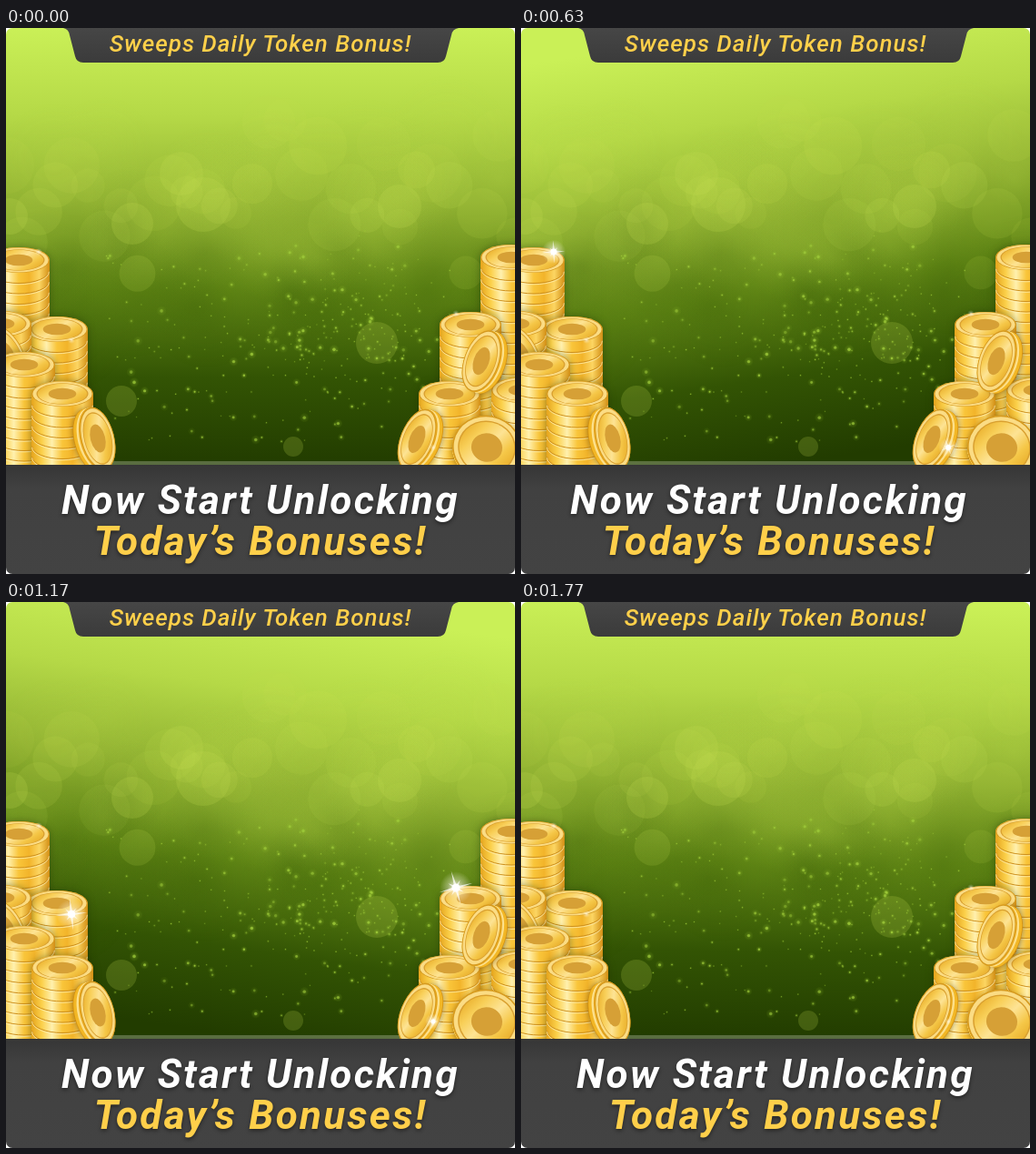
Write an HTML page with a canvas that moves like this. It is 560x600 px and loops after 1.8 s.

```html
<!DOCTYPE html>
<html lang="en">
<head>
<meta charset="utf-8">
<title>Daily bonus</title>
<style>
  html, body { margin: 0; width: 100%; height: 100%; overflow: hidden; background: #fff; }
  #stage { position: relative; width: 560px; height: 600px; overflow: hidden; border-radius: 7px; }
  canvas, svg { position: absolute; left: 0; top: 0; display: block; }
  text { font-family: Roboto, "Liberation Sans", sans-serif; font-style: italic; text-anchor: middle; }
  .small { font-size: 26px; font-weight: 500; letter-spacing: 1px; fill: #ffd04a; }
  .big { font-size: 44px; font-weight: 700; letter-spacing: 2.3px; }
  #slogan { filter: drop-shadow(0 2px 2px rgba(0, 0, 0, .45)); }
</style>
</head>
<body>
<div id="stage">
  <canvas id="scene" width="560" height="480"></canvas>
  <svg width="560" height="600" viewBox="0 0 560 600">
    <defs>
      <linearGradient id="panel" x1="0" y1="0" x2="0" y2="1">
        <stop offset="0" stop-color="#363636"/>
        <stop offset=".22" stop-color="#414141"/>
        <stop offset="1" stop-color="#434343"/>
      </linearGradient>
      <linearGradient id="tab" x1="0" y1="0" x2="0" y2="1">
        <stop offset="0" stop-color="#464646"/>
        <stop offset="1" stop-color="#3b3b3b"/>
      </linearGradient>
    </defs>
    <rect y="480" width="560" height="120" fill="url(#panel)"/>
    <path d="M63 0Q69 1 70 8L76 31Q77.500 38 85 38H475Q482.500 38 484 31L490 8Q491 1 498 0Z" fill="url(#tab)"/>
    <text class="small" x="280" y="26">Sweeps Daily Token Bonus!</text>
    <g id="slogan">
      <text class="big" x="280" y="534" fill="#fff">Now Start Unlocking</text>
      <text class="big" x="280" y="579" fill="#ffcf4a">Today’s Bonuses!</text>
    </g>
  </svg>
</div>
<script>
const LOOP = 1800, STEP = 30, W = 560, H = 480, TAU = Math.PI * 2;
const scene = document.getElementById('scene').getContext('2d');
const slogan = document.getElementById('slogan');

let seed = 90210;
function rand(from = 0, to = 1) {
  seed = (seed * 16807) % 2147483647;
  return from + (to - from) * seed / 2147483647;
}
const bell = () => (rand() + rand() + rand()) / 1.5 - 1;

function layer(draw) {
  const c = document.createElement('canvas');
  c.width = W;
  c.height = H;
  draw(c.getContext('2d'));
  return c;
}

// Evenly spaced colours
function ramp(gradient, colors) {
  colors.forEach((color, i) => gradient.addColorStop(i / (colors.length - 1), color));
  return gradient;
}

function oval(g, x, y, rx, ry, rot = 0) {
  g.beginPath();
  g.ellipse(x, y, rx, ry, rot, 0, TAU);
}

function dot(g, x, y, r, color) {
  g.fillStyle = color;
  oval(g, x, y, r, r);
  g.fill();
}

function glow(g, x, y, r, rgb, alpha) {
  const fade = [1, .4, 0].map(k => `rgba(${rgb},${alpha * k})`);
  dot(g, x, y, r, ramp(g.createRadialGradient(x, y, 0, x, y, r), fade));
}

// Backdrop: light that tips from side to side
const sky = ramp(scene.createLinearGradient(0, 0, 0, H),
  ['#caf057', '#b5d947', '#91b232', '#608615', '#335404', '#223c00']);

function drawSky(t) {
  const tilt = -.18 * Math.sin(t / LOOP * TAU);
  scene.save();
  scene.transform(1, tilt, 0, 1, 0, -tilt * W / 2);
  scene.fillStyle = sky;
  scene.fillRect(0, -100, W, H + 200);
  scene.restore();
}

function bokeh(g, x, y, r, alpha) {
  dot(g, x, y, r, `rgba(196,220,82,${alpha})`);
}

function speck(g, x, y, r, alpha) {
  glow(g, x, y, r * 2.2, '155,200,50', alpha * .6);
  dot(g, x, y, r * .7, `rgba(160,204,60,${alpha})`);
}

// The clearest light spots: x, y, radius
const SPOTS = [[433, 196, 24], [408, 346, 23], [193, 160, 24], [139, 215, 23],
  [217, 194, 30], [4, 207, 20], [127, 410, 17], [316, 460, 11]];

const haze = layer(g => {
  for (let i = 0; i < 50; i++) {
    const [y, rgb] = i % 2 ? [275, '45,80,0'] : [185, '190,220,75'];
    glow(g, rand(0, W), y + bell() * 110, rand(30, 75), rgb, .12);
  }
  for (let i = 0; i < 32; i++) {
    bokeh(g, i * W / 31, 185 + bell() * 115, rand(17, 33), rand(.06, .15));
  }
  SPOTS.forEach(([x, y, r]) => bokeh(g, x, y, r, .2));
  for (let i = 0; i < 330; i++) {
    const [x, y] = i % 2
      ? [370 + bell() * 170, 335 + bell() * 130]
      : [rand(110, 490), rand(245, 455)];
    speck(g, x, y, .7 + 1.9 * rand() ** 3, rand(.35, .85));
  }
  g.fillStyle = 'rgba(255,255,255,.25)';
  g.fillRect(0, 476, W, 4);
});

// Coins
const RIM = ['#e5a41c', '#fbd04a', '#fff0ae', '#f9c53a', '#f2b42a', '#fcd562', '#d28e14'];
const FACE = ['#e9ae2a', '#f8cf58', '#fde394', '#f5c748', '#e7ab28'];

function face(g, x, y, rx, ry, rot) {
  g.save();
  g.translate(x, y);
  g.rotate(rot);
  g.scale(rx, ry);
  dot(g, 0, 0, 1, '#d59a20');
  dot(g, 0, 0, .96, '#fbdc84');
  dot(g, 0, 0, .84, '#d9a030');
  dot(g, 0, 0, .8, ramp(g.createLinearGradient(-.8, -.5, .8, .5), FACE));
  dot(g, 0, 0, .45, '#d6a036');
  g.restore();
}

function stack(g, x, y) {
  const rx = 34, ry = 14, coinHeight = 11.5;
  g.save();
  g.shadowColor = 'rgba(25,45,0,.45)';
  g.shadowBlur = 9;
  g.fillStyle = ramp(g.createLinearGradient(x - rx, 0, x + rx, 0), RIM);
  g.beginPath();
  g.ellipse(x, y, rx, ry, 0, Math.PI, TAU);
  g.lineTo(x + rx, H + 20);
  g.lineTo(x - rx, H + 20);
  g.fill();
  g.restore();
  const seam = (level, color) => {
    g.strokeStyle = color;
    g.beginPath();
    g.ellipse(x, level, rx - .6, ry, 0, 0, Math.PI);
    g.stroke();
  };
  for (let level = y + coinHeight; level < H; level += coinHeight) {
    seam(level, '#cd8f1c');
    seam(level + 1.3, 'rgba(255,244,190,.7)');
  }
  face(g, x, y, rx, ry, 0);
}

// A leaning coin; the narrower it is seen, the more of its edge shows
function coin(g, x, y, rx, rot) {
  const ry = 35, edge = Math.sign(rot) * (38 - rx) * .4;
  g.save();
  g.shadowColor = 'rgba(70,45,0,.5)';
  g.shadowBlur = 6;
  for (let k = 1; k > 0; k -= .1) {
    g.fillStyle = k > .9 ? '#d8940f' : k > .6 ? '#f2b726' : k > .3 ? '#fde08a' : '#e5a51d';
    oval(g, x + edge * k, y + 2 * k, rx, ry, rot);
    g.fill();
    g.shadowBlur = 0;
    g.shadowColor = 'transparent';
  }
  g.restore();
  face(g, x, y, rx, ry, rot);
}

const coins = layer(g => {
  const pile = (...tops) => tops.forEach(([x, y]) => stack(g, x, y));
  pile([14, 255], [56, 331], [-6, 325]);
  coin(g, 0, 358, 18, -.5);
  pile([20, 370], [62, 402]);
  coin(g, 101, 451, 18, -.25);

  pile([556, 252], [511, 326], [568, 398], [488, 402]);
  coin(g, 523, 366, 19, .34);
  coin(g, 452, 452, 18, .38);
  coin(g, 529, 461, 38, .2);
});

// Sparkles: place and brightest moment
const SPARKS = [[36, 246, 430], [470, 461, 880], [72, 343, 1040], [495, 314, 1275]];

function ray(angle, length, half) {
  scene.save();
  scene.rotate(angle);
  scene.beginPath();
  scene.moveTo(0, -half);
  scene.lineTo(length, 0);
  scene.lineTo(0, half);
  scene.fill();
  scene.restore();
}

function drawSpark([x, y, peak], t) {
  const life = Math.max(0, 1 - Math.abs(t - peak) / 370);
  glow(scene, x, y, 4, '255,255,255', .6);
  if (!life) return;
  const r = 30 * life;
  scene.save();
  scene.translate(x, y);
  scene.rotate((t - peak) / 1400 - .2);
  glow(scene, 0, 0, 5 + r * .6, '255,252,235', .95);
  scene.fillStyle = `rgba(255,255,255,${.35 + .55 * life})`;
  for (let i = 0; i < 8; i++) {
    ray(i * TAU / 8, i % 2 ? r * .45 : r * .9, 1 + r * .03);
  }
  dot(scene, 0, 0, 1.5 + r * .14, '#fff');
  scene.restore();
}

// Five swings left and right, at rest before and after
function shake(t) {
  const k = (t - 570) / 48;
  if (k <= 0 || k >= 10) return 0;
  const i = Math.floor(k), f = k - i;
  const pose = n => n % 10 === 0 ? 0 : n % 2 ? -10 : 10;
  return pose(i) + (pose(i + 1) - pose(i)) * f * f * (3 - 2 * f);
}

function render(t) {
  drawSky(t);
  scene.drawImage(haze, 0, 0);
  scene.drawImage(coins, 0, 0);
  SPARKS.forEach(s => drawSpark(s, t));
  slogan.setAttribute('transform', `translate(${shake(t)} 0)`);
}

const start = performance.now();
function tick() {
  const t = (performance.now() - start) % LOOP;
  render(Math.floor(t / STEP) * STEP);
  requestAnimationFrame(tick);
}
tick();
</script>
</body>
</html>
```
